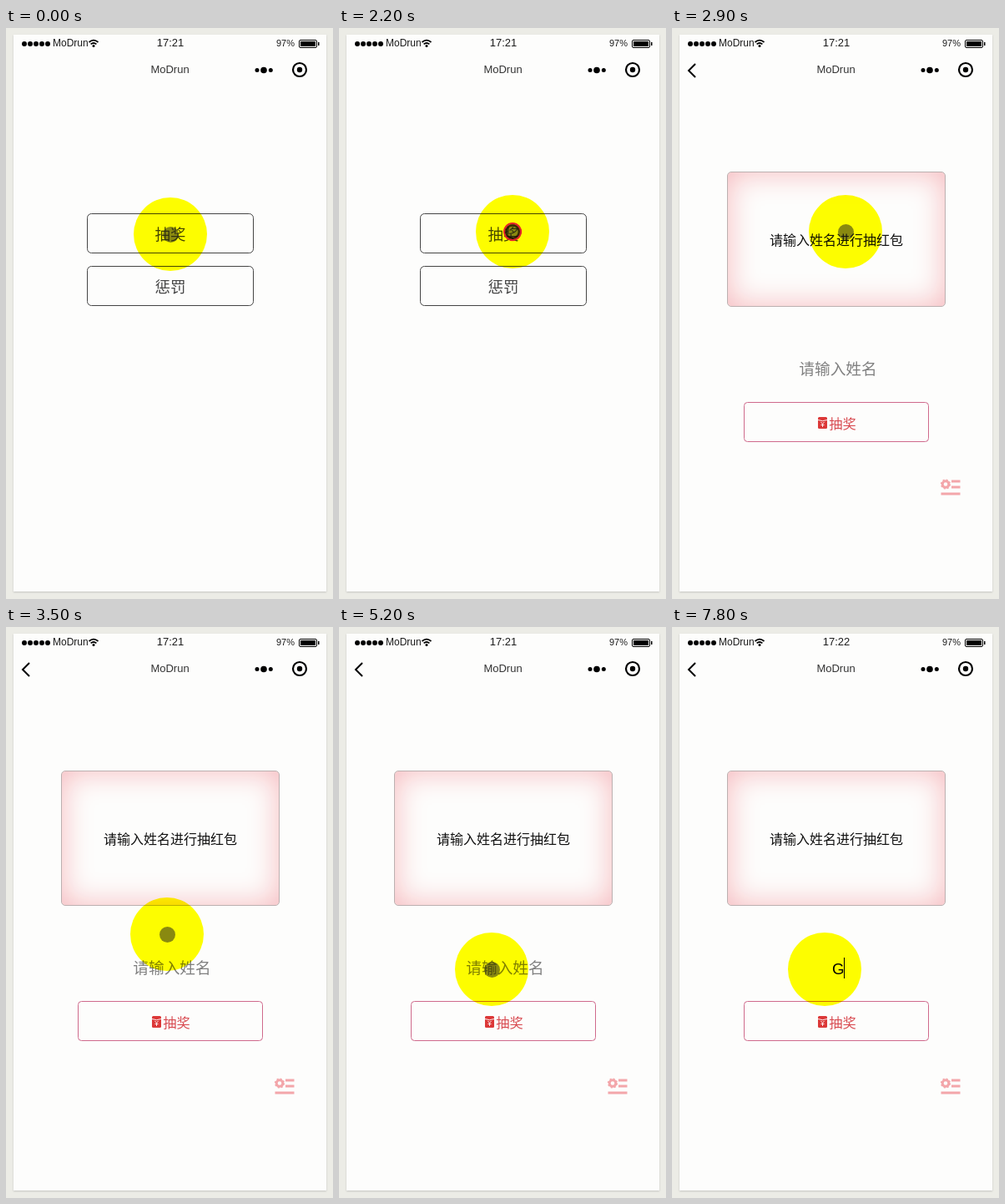
An HTML page for the animation above (8000 ms loop, 392 by 684 pixels).

```html
<!DOCTYPE html>
<html lang="zh-CN">
<head>
<meta charset="utf-8">
<title>抽奖</title>
<style>
  html, body { margin: 0; width: 100%; height: 100%; overflow: hidden; }
  #stage { position: relative; width: 392px; height: 684px; overflow: hidden; isolation: isolate; background: #ecece6; }
  .phone { position: absolute; left: 9px; top: 8px; width: 375px; height: 667px; background: #fdfdfc; box-shadow: 0 1px 2px #c4c4c0; }
  svg { position: absolute; left: 0; top: 0; width: 392px; height: 684px; }
  text { font-family: "Liberation Sans", Arial, sans-serif; }
  .cn { font-family: "Noto Sans CJK SC", "Noto Sans CJK", sans-serif; font-weight: 300; text-anchor: middle; }
  .mid { text-anchor: middle; }
  .line { fill: none; stroke: #000; }

  .view { position: absolute; left: 9px; top: 64px; width: 375px; height: 611px; overflow: hidden; }
  .page { position: absolute; inset: 0; background: #fdfdfc; }
  .page svg { left: -9px; top: -64px; }
  .card { position: absolute; left: 57px; top: 108px; width: 260px; height: 160px; border: 1px solid #bcb0b0; border-radius: 5px;
    box-shadow: inset 0 0 36px #f6b8bc; }

  .disc, .dot, .ring { position: absolute; left: 0; top: 0; border-radius: 50%; }
  .disc { width: 88px; height: 88px; margin: -44px; background: #ff0; mix-blend-mode: multiply; }
  .dot { width: 19px; height: 19px; margin: -9.5px; background: rgba(30, 30, 30, .52); }
  .ring { box-sizing: border-box; width: 22px; height: 22px; margin: -11px; border: 2px solid #e3202a;
    box-shadow: inset 0 0 0 2.5px rgba(20, 0, 0, .7); }

  .disc, .dot, .ring, .page, .back, .caret, .hint, .typed, .old, .new { animation: 8s step-end infinite; }
  .disc { animation-name: move; }
  .dot { animation-name: move, untyped; }
  .ring { animation-name: move, click; }
  .page { animation-name: slide; }
  .back { animation-name: back; }
  .caret { animation-name: blink; }
  .hint { animation-name: untyped; }
  .typed { animation-name: typed; }
  .old { animation-name: before; }
  .new { animation-name: after; }

  @keyframes move {
    0% { transform: translate(197px, 247px); }
    1.25% { transform: translate(201px, 246px); }
    2.5% { transform: translate(206px, 245px); }
    3.75% { transform: translate(208px, 244px); }
    42.5% { transform: translate(203px, 302px); }
    43.75% { transform: translate(193px, 368px); }
    45% { transform: translate(188px, 391px); }
    46.25% { transform: translate(185px, 401px); }
    47.5% { transform: translate(184px, 406px); }
    48.75% { transform: translate(183px, 409px); }
    50%, 100% { transform: translate(183px, 410px); }
  }
  @keyframes click {
    0%, 30%, 58.75%, 87.5%, 100% { opacity: 0; scale: 1; }
    27.5%, 56.25%, 85% { opacity: 1; scale: 1; }
    28.75%, 57.5%, 86.25% { opacity: .5; scale: 1.7; }
  }
  @keyframes slide {
    0% { transform: translateX(100%); }
    30% { transform: translateX(78%); }
    31.25% { transform: translateX(50%); }
    32.5% { transform: translateX(27%); }
    33.75% { transform: translateX(12%); }
    35% { transform: translateX(4%); }
    36.25%, 100% { transform: none; }
  }
  @keyframes back { 0% { opacity: 0; } 31.25%, 100% { opacity: 1; } }
  @keyframes blink {
    0%, 65%, 77.5%, 91.25%, 100% { opacity: 0; }
    58.75%, 71.25%, 85% { opacity: 1; }
  }
  @keyframes untyped { 0% { opacity: 1; } 95%, 100% { opacity: 0; } }
  @keyframes typed { 0% { opacity: 0; } 95%, 100% { opacity: 1; } }
  @keyframes before { 0% { opacity: 1; } 97.5%, 100% { opacity: 0; } }
  @keyframes after { 0% { opacity: 0; } 97.5%, 100% { opacity: 1; } }
</style>
</head>
<body>
<div id="stage">
  <div class="phone"></div>

  <svg viewBox="0 0 392 684">
    <!-- status bar -->
    <path d="M22 19h28.1" stroke="#000" stroke-width="6" stroke-linecap="round" stroke-dasharray="0 7"/>
    <text x="56" y="22" font-size="12" fill="#1c1c1c">MoDrun</text>
    <path class="line" d="M99.5 17q5.5-4.6 11 0M101.6 19.4q3.4-2.8 6.8 0" stroke-width="1.7"/>
    <circle cx="105" cy="21.6" r="1.5"/>
    <g class="mid" font-size="13" fill="#1c1c1c">
      <text class="old" x="197" y="22">17:21</text>
      <text class="new" x="197" y="22">17:22</text>
    </g>
    <text x="324" y="22" font-size="11" fill="#1c1c1c">97%</text>
    <rect class="line" x="351.5" y="14.5" width="21" height="9" rx="1.5"/>
    <path d="M353 16h18v6h-18zM374 17h1.5v4h-1.5z"/>

    <!-- title bar -->
    <text class="mid" x="196.5" y="54" font-size="13" fill="#333">MoDrun</text>
    <circle cx="301" cy="50.5" r="2.5"/>
    <circle cx="309" cy="50.5" r="3.8"/>
    <circle cx="317.3" cy="50.5" r="2.5"/>
    <circle class="line" cx="352" cy="50" r="8" stroke-width="2.2"/>
    <circle cx="352" cy="50" r="3.2"/>
    <path class="line back" d="M28 43l-8 8 8 8" stroke-width="2"/>

    <!-- menu -->
    <g fill="none" stroke="#454545">
      <rect x="97.5" y="222.5" width="199" height="47" rx="5"/>
      <rect x="97.5" y="285.5" width="199" height="47" rx="5"/>
    </g>
    <g font-size="18.5" fill="#454545">
      <text class="cn" x="197" y="253.5">抽奖</text>
      <text class="cn" x="197" y="316.5">惩罚</text>
    </g>
  </svg>

  <div class="view">
    <div class="page">
      <div class="card"></div>
      <svg viewBox="0 0 392 684">
        <text class="cn" x="197" y="259.5" font-size="16" fill="#111">请输入姓名进行抽红包</text>

        <text class="cn hint" x="199" y="414.5" font-size="18.7" fill="#808080">请输入姓名</text>
        <path class="line caret" d="M199.5 396v25"/>
        <g class="typed">
          <text x="192" y="416" font-size="18.7" fill="#00005c">G</text>
          <path class="line" d="M206.5 396v25"/>
        </g>

        <rect x="86.5" y="448.5" width="221" height="47" rx="4" fill="none" stroke="#cf6a8c"/>
        <rect x="175" y="466" width="11" height="14" rx="1.5" fill="#dc3838"/>
        <path d="M175 469.5q5.5 2.4 11 0M178.5 472l2 2.5 2-2.5M180.5 474.5v3.5M178.5 475.5h4" fill="none" stroke="#fff" stroke-width=".9"/>
        <text class="cn" x="204.5" y="479.5" font-size="16.3" fill="#d84a50">抽奖</text>

        <g fill="none" stroke="#f3a6aa">
          <circle cx="328" cy="546.5" r="3.8" stroke-width="3"/>
          <circle cx="328" cy="546.5" r="5.4" stroke-width="1.4" stroke-dasharray="2.1 2.14"/>
          <path d="M335 543h10.5M335 550h10.5M322.5 558h23" stroke-width="3"/>
        </g>
      </svg>
    </div>
  </div>

  <div class="disc"></div>
  <div class="dot"></div>
  <div class="ring"></div>
</div>
</body>
</html>
```
